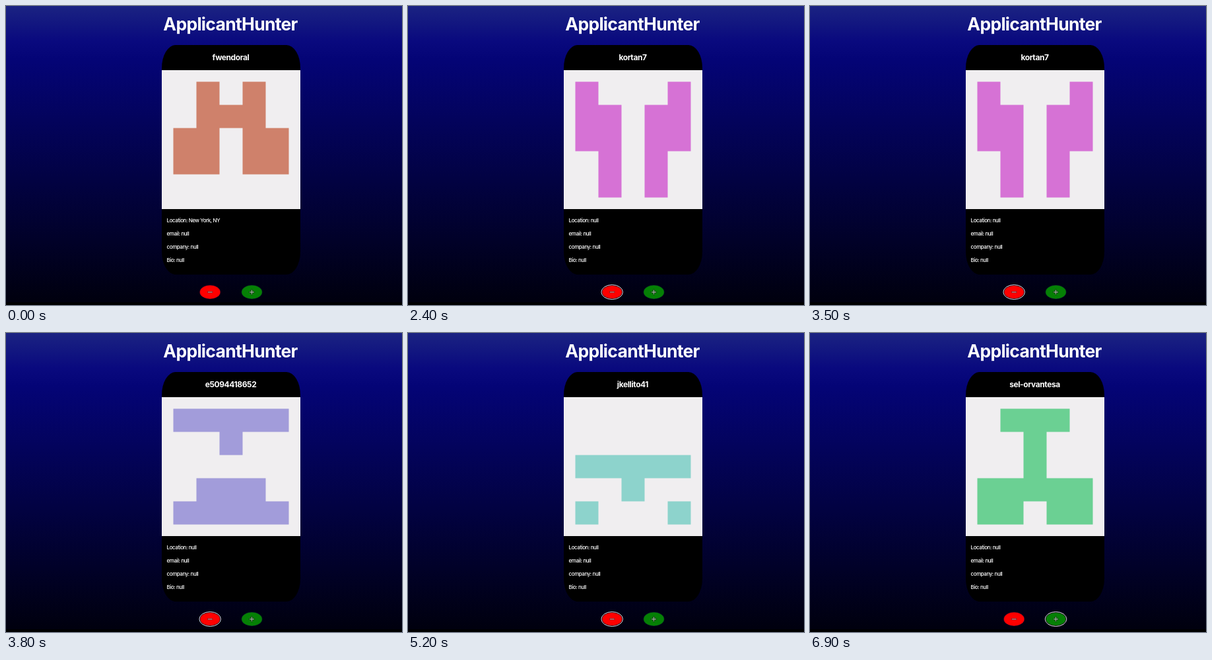
An HTML page that plays this animation: 600 by 452 pixels, repeating every 8 s.

```html
<!DOCTYPE html>
<html lang="en">
<head>
<meta charset="utf-8">
<title>ApplicantHunter</title>
<style>
  html, body { margin: 0; width: 100%; height: 100%; overflow: hidden; background: #000; }
  svg { display: block; width: 600px; height: 452px; }
  text { font-family: Inter, "Liberation Sans", sans-serif; fill: #fff; }
  .title { font-size: 26.5px; font-weight: 700; letter-spacing: -.7px; text-anchor: middle; }
  .name { font-size: 12px; font-weight: 700; letter-spacing: -.4px; text-anchor: middle; }
  .info { font-size: 8px; font-weight: 500; letter-spacing: -.45px; }
  .edge { fill: none; stroke: #0a0a30; stroke-width: 1; stroke-dasharray: 1 1; }
  .ring { fill: none; stroke: #d8d8e2; stroke-width: 1; }
  .gap { fill: none; stroke: #16060c; stroke-width: 1; }
  .sign { fill: none; stroke-linecap: square; }
</style>
</head>
<body>
<svg viewBox="0 0 600 452">
  <defs>
    <linearGradient id="sky" x1="0" y1="0" x2="0" y2="1">
      <stop offset="0" stop-color="#1b2382"/>
      <stop offset=".12" stop-color="#09097e"/>
      <stop offset=".18" stop-color="#040476"/>
      <stop offset="1" stop-color="#00000e"/>
    </linearGradient>
    <ellipse id="edge" class="edge" rx="15.6" ry="10.4"/>
    <g id="focus">
      <ellipse class="gap" rx="15.4" ry="10.1"/>
      <ellipse class="ring" rx="16.3" ry="11"/>
    </g>
  </defs>
  <rect width="600" height="448" fill="url(#sky)"/>
  <text class="title" x="340" y="37">ApplicantHunter</text>
  <rect x="236" y="59" width="210" height="347" rx="10%" ry="10%" style="rx: 21px; ry: 34.7px"/>
  <text class="name" id="name" x="340.5" y="82"></text>
  <rect x="236" y="97" width="210" height="210" fill="#f0eef0"/>
  <path id="icon"/>
  <text class="info" id="place" x="243.6" y="327"></text>
  <text class="info" x="243.6" y="347">email: null</text>
  <text class="info" x="243.6" y="367">company: null</text>
  <text class="info" x="243.6" y="387">Bio: null</text>
  <g transform="translate(309.2 432.5)">
    <ellipse rx="15.7" ry="10.4" fill="#f00"/>
    <use href="#edge"/>
    <use href="#focus" id="ringNo"/>
    <path class="sign" d="M-3 0H3" stroke="#400" stroke-width="2"/>
    <path class="sign" d="M-3 0H3" stroke="#c8b0b8" stroke-width="1"/>
  </g>
  <g transform="translate(372.5 432.5)">
    <ellipse rx="15.7" ry="10.4" fill="#058005"/>
    <use href="#edge"/>
    <use href="#focus" id="ringYes"/>
    <path class="sign" d="M-3 0H3M0-3V3" stroke="#022002" stroke-width="2.2"/>
    <path class="sign" d="M-3 0H3M0-3V3" stroke="#c8d0c8" stroke-width=".9"/>
  </g>
</svg>
<script>
const LOOP = 8000, CELL = 35;
const $ = id => document.getElementById(id);

// named: when the text changes; drawn: when its avatar has loaded
const people = [
  { named: 0, drawn: 0, name: "fwendoral", place: "New York, NY", color: "#cf816b",
    grid: ".X.X. .XXX. XX.XX XX.XX ....." },
  { named: 2300, drawn: 2400, name: "kortan7", place: "null", color: "#d672d5",
    grid: "X...X XX.XX XX.XX .X.X. .X.X." },
  { named: 3700, drawn: 3800, name: "e5094418652", place: "null", color: "#a29cda",
    grid: "XXXXX ..X.. ..... .XXX. XXXXX" },
  { named: 5000, drawn: 5100, name: "jkellito41", place: "null", color: "#8dd3cc",
    grid: "..... ..... XXXXX ..X.. X...X" },
  { named: 6800, drawn: 6900, name: "sel-orvantesa", place: "null", color: "#6bd093",
    grid: ".XXX. ..X.. ..X.. XXXXX XX.XX" }
];

// one rectangle per run of filled cells
function iconPath(grid) {
  let d = "";
  grid.split(" ").forEach((row, y) => {
    for (const run of row.matchAll(/X+/g)) {
      const w = run[0].length * CELL;
      d += `M${253.5 + run.index * CELL} ${114.5 + y * CELL}h${w}v${CELL}h${-w}z`;
    }
  });
  return d;
}
people.forEach(p => p.path = iconPath(p.grid));

const latest = (key, t) => people.filter(p => p[key] <= t).pop();
const fade = (t, start, span) => Math.min(1, Math.max(0, (t - start) / span));

let shownName, shownIcon;
function draw(t) {
  const who = latest("named", t), pic = latest("drawn", t);
  if (who !== shownName) {
    $("name").textContent = who.name;
    $("place").textContent = "Location: " + who.place;
    shownName = who;
  }
  if (pic !== shownIcon) {
    $("icon").setAttribute("d", pic.path);
    $("icon").setAttribute("fill", pic.color);
    shownIcon = pic;
  }
  const onGreen = t >= 6200;
  $("ringNo").style.opacity = onGreen ? 0 : fade(t, 50, 150);
  $("ringYes").style.opacity = onGreen ? 1 : 0;
}

const start = performance.now();
function tick() {
  draw((performance.now() - start) % LOOP);
  requestAnimationFrame(tick);
}
draw(0);
tick();
</script>
</body>
</html>
```
